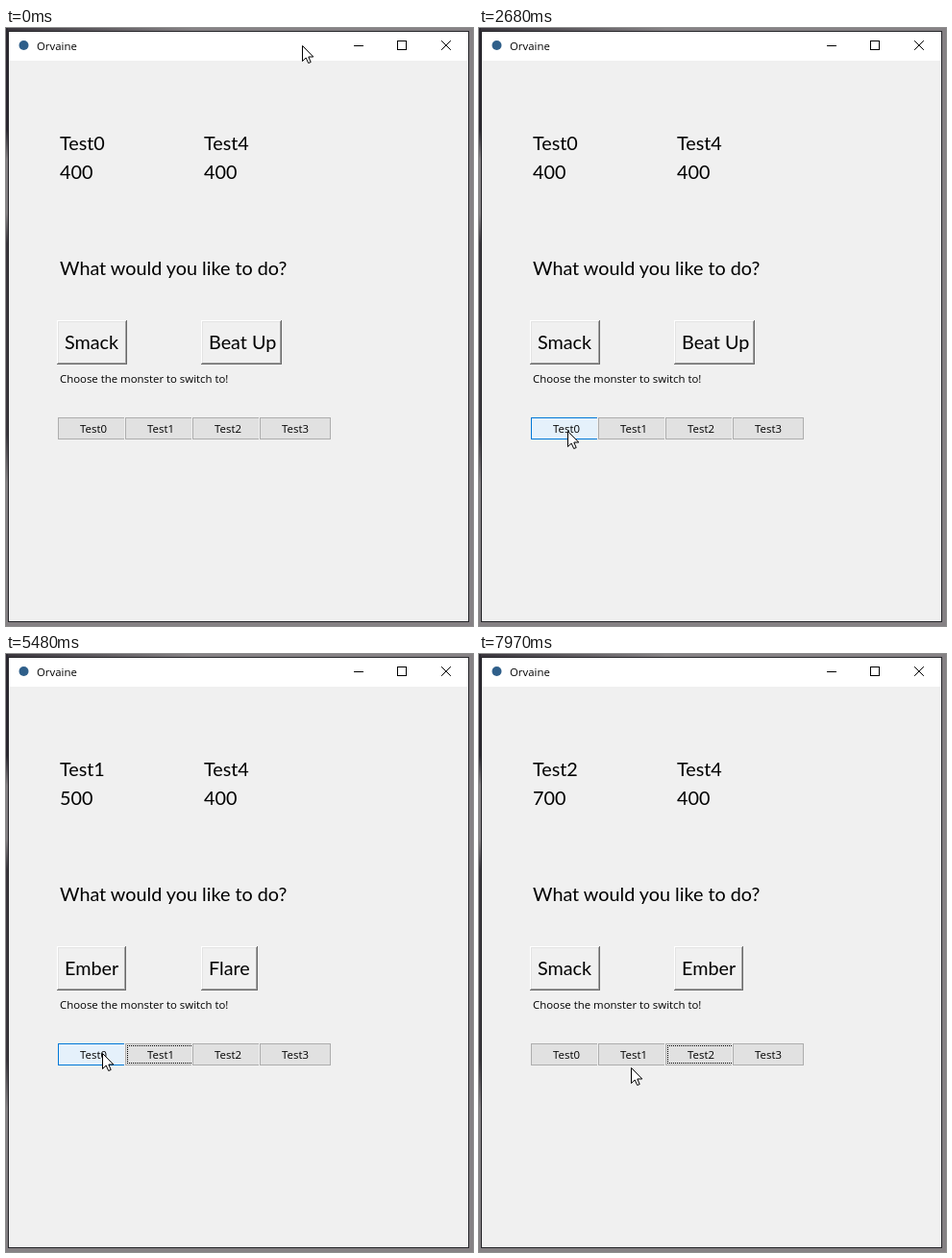
These frames come from a looping animation (486x622 px, 8000 ms). An HTML page:

```html
<!DOCTYPE html>
<html lang="en">
<head>
<meta charset="utf-8">
<title>Orvaine</title>
<style>
  html, body { margin: 0; width: 100%; height: 100%; overflow: hidden; }
  svg { display: block; }
  rect, .line { shape-rendering: crispEdges; }
  text { font: 11.4px "Open Sans", sans-serif; white-space: pre; }
  .big { font: 19.8px Lato, sans-serif; }
  .mid { text-anchor: middle; }
</style>
</head>
<body>
<svg width="486" height="622" viewBox="0 0 486 622">
  <defs>
    <linearGradient id="top">
      <stop offset="0" stop-color="#38343b"/>
      <stop offset=".4" stop-color="#858184"/>
    </linearGradient>
    <linearGradient id="left" x2="0" y2="1">
      <stop offset=".17" stop-color="#2b2830"/>
      <stop offset=".22" stop-color="#858184"/>
      <stop offset=".31" stop-color="#858184"/>
      <stop offset=".36" stop-color="#3b373e"/>
      <stop offset=".68" stop-color="#3b373e"/>
      <stop offset=".76" stop-color="#858184"/>
    </linearGradient>
  </defs>
  <rect width="486" height="622" fill="#858184"/>
  <rect width="486" height="3" fill="url(#top)"/>
  <rect width="2" height="622" fill="url(#left)"/>
  <rect x="2" y="3" width="480" height="615" fill="#252529"/>
  <rect x="3" y="4" width="478" height="30" fill="#fff"/>
  <rect x="3" y="34" width="478" height="583" fill="#f0f0f0"/>
  <circle cx="18.5" cy="18" r="5" fill="#2f5f8a"/>
  <text x="32" y="23">Orvaine</text>
  <path class="line" d="M362 18.5h10M407.5 13.5h9v9h-9z" fill="none" stroke="#000"/>
  <path d="M453.5 13.5l9 9M462.5 13.5l-9 9" stroke="#000" stroke-linecap="square"/>
  <text class="big" x="56" y="257">What would you like to do?</text>
  <text x="56" y="369">Choose the monster to switch to!</text>
  <g id="live"></g>
  <path id="cursor" d="M.5.5V16.5L4.2 13 6.7 18.5 9.2 17.5 6.8 12H11.8Z" fill="#fff" stroke="#000"/>
</svg>
<script>
const LOOP = 8000, TICK = 76.5;
const live = document.getElementById("live");
const cursor = document.getElementById("cursor");

// Pointer strokes: first and last step, end point, vertical bow
const strokes = [
  [610, 610, 310, 20, 0],
  [930, 1230, 268, 20, -11],
  [1540, 1620, 204, 53, 0],
  [1850, 2080, 71, 302, 0],
  [2155, 2610, 70, 412, 0],
  [2680, 3230, 162, 423, 7],
  [5020, 5480, 100, 415, 3],
  [6180, 6730, 235, 424, 7],
  [7740, 7970, 158, 430, 3]
];

// Press time and index of each chosen monster
const clicks = [[3690, 1], [5650, 0], [7200, 2]];

const monsters = [
  { hp: 400, attacks: ["Smack", "Beat Up"] },
  { hp: 500, attacks: ["Ember", "Flare"] },
  { hp: 700, attacks: ["Smack", "Ember"] }
];
const widths = { "Smack": 73, "Beat Up": 84, "Ember": 72, "Flare": 59 };

function pointer(t) {
  let x = 308, y = 18;
  for (const [start, end, toX, toY, bow] of strokes) {
    if (t < start) break;
    const count = Math.round((end - start) / TICK) + 1;
    const gap = (end - start) / (count - 1) || 1;
    const u = Math.min(1, (Math.floor((t - start) / gap + 1e-6) + 1) / count);
    const ease = u * (2 - u);
    x += (toX - x) * ease;
    y += (toY - y) * ease + bow * Math.sin(Math.PI * ease);
  }
  return [Math.round(x), Math.round(y)];
}

const rect = (x, y, w, h, fill) =>
  `<rect x="${x}" y="${y}" width="${w}" height="${h}" fill="${fill}"/>`;
const text = (x, y, s, cls) => `<text x="${x}" y="${y}" class="${cls}">${s}</text>`;

function attack(x, name) {
  const w = widths[name];
  return rect(x, 304, w, 46, "#696969") + rect(x, 304, w - 1, 45, "#fff") +
    rect(x + 1, 305, w - 2, 44, "#a0a0a0") + rect(x + 1, 305, w - 3, 43, "#e3e3e3") +
    rect(x + 2, 306, w - 4, 42, "#f0f0f0") + text(x + 8, 334, name, "big");
}

function choice(i, hover, pressed, focus) {
  const x = 54 + 70 * i;
  const [edge, fill] = pressed ? ["#005499", "#cce4f7"]
    : hover ? ["#0078d7", "#e5f1fb"] : ["#adadad", "#e1e1e1"];
  const ring = `<path class="line" d="M${x + 2} 407.5h70m-70 18h70M${x + 2.5} 407v19m69-19v19" stroke="#000" stroke-dasharray="1"/>`;
  return rect(x - 1, 404, 76, 25, "#f0f0f0") + rect(x, 405, 74, 23, edge) +
    rect(x + 1, 406, 72, 21, fill) + (focus ? ring : "") +
    text(x + 37, 421, "Test" + i, "mid");
}

let shown = "";
function draw(t) {
  const [px, py] = pointer(t);
  let selected = 0, focus = -1, pressed = -1;
  for (const [down, i] of clicks) {
    if (t < down) break;
    focus = i;
    if (t < down + TICK) pressed = i;
    else selected = i;
  }
  const { hp, attacks } = monsters[selected];
  const hover = py >= 405 && py < 428 ? Math.floor((px - 54) / 70) : -1;
  const html = text(56, 127, "Test" + selected, "big") + text(56, 157, hp, "big") +
    text(206, 127, "Test4", "big") + text(206, 157, 400, "big") +
    attack(53, attacks[0]) + attack(203, attacks[1]) +
    [0, 1, 2, 3].map(i => choice(i, i === hover, i === pressed, i === focus)).join("");
  if (html !== shown) live.innerHTML = shown = html;
  cursor.setAttribute("transform", `translate(${px} ${py})`);
}

const begin = performance.now();
function tick() {
  draw((performance.now() - begin) % LOOP);
  requestAnimationFrame(tick);
}
tick();
</script>
</body>
</html>
```
